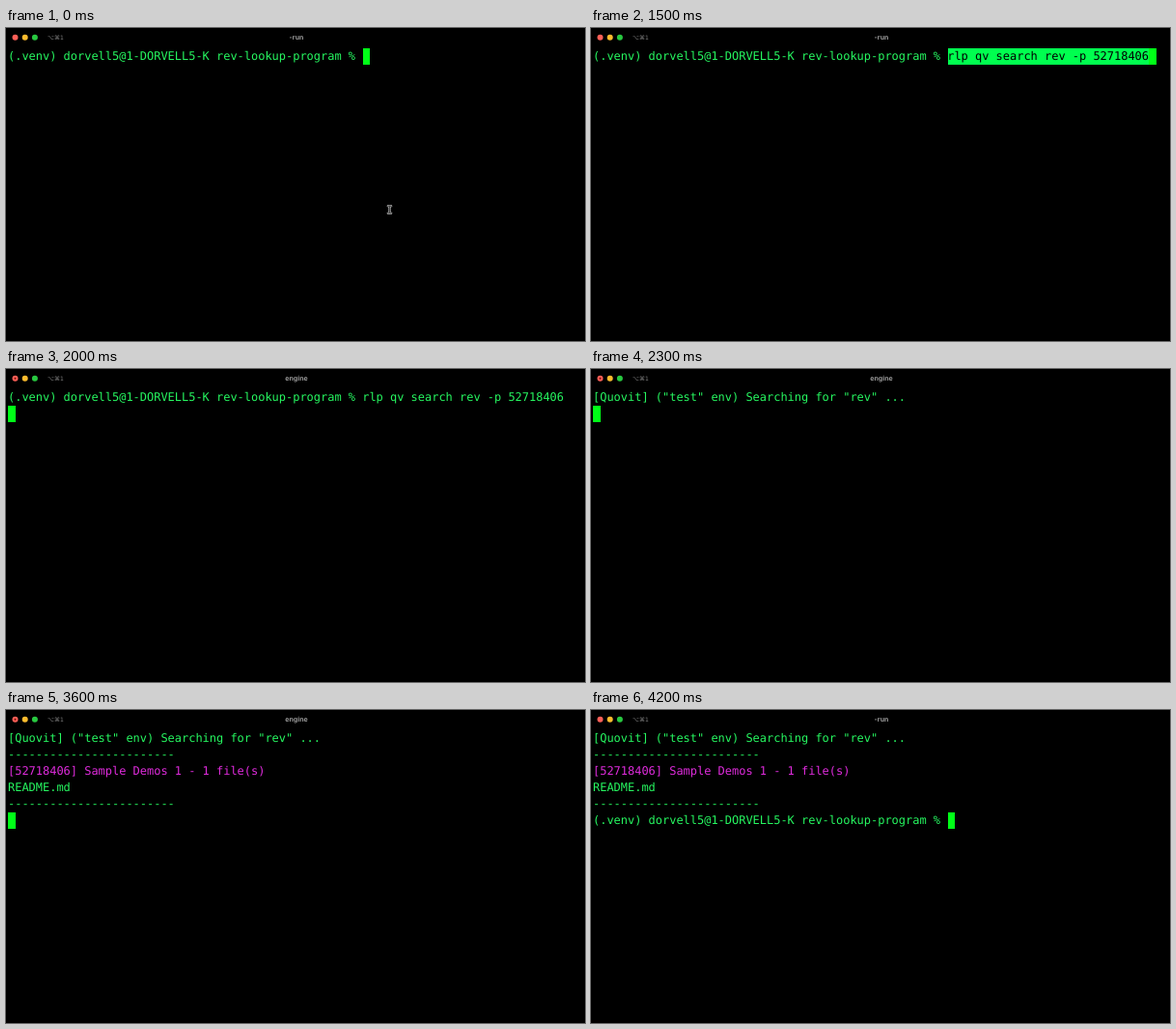
Recreate the animation shown at these times as an HTML page with a canvas. Size 600 by 324 pixels, loop 4500 ms.

```html
<!DOCTYPE html>
<html lang="en">
<head>
<meta charset="utf-8">
<title>Terminal session</title>
<style>
html, body { margin: 0; width: 100%; height: 100%; overflow: hidden; background: #000; }
canvas { display: block; }
</style>
</head>
<body>
<canvas id="stage" width="600" height="324"></canvas>
<script>
const ctx = document.getElementById('stage').getContext('2d');
ctx.textRendering = 'geometricPrecision';
const LOOP = 4500, CELL = 7.2, LINE = 17, LEFT = 2, TOP = 21;
const TEXT = '#26f760', PASTED = '#00ff4f', CURSOR = '#00ff17', MAGENTA = '#df2bdc';
const MONO = '12px "DejaVu Sans Mono", monospace';

const PROMPT = '(.venv) dorvell5@1-DORVELL5-K rev-lookup-program % ';
const COMMAND = 'rlp qv search rev -p 52718406';
const RULE = '-'.repeat(24);
const SEARCHING = '[Quovit] ("test" env) Searching for "rev" ...';
const RESULTS = [RULE, '[52718406] Sample Demos 1 - 1 file(s)', 'README.md', RULE];

const edge = col => Math.ceil(LEFT + col * CELL);

function block(col, row, cells, color) {
  ctx.fillStyle = color;
  ctx.fillRect(edge(col), TOP + row * LINE, edge(col + cells) - edge(col), LINE);
}

// Every character sits on the terminal grid.
function write(text, col, row, color = TEXT) {
  ctx.font = MONO;
  ctx.textAlign = 'left';
  ctx.fillStyle = color;
  [...text].forEach((ch, i) =>
    ctx.fillText(ch, LEFT + (col + i) * CELL, TOP + 12 + row * LINE));
}

function dot(x, y, r, color) {
  ctx.fillStyle = color;
  ctx.beginPath();
  ctx.arc(x, y, r, 0, 2 * Math.PI);
  ctx.fill();
}

function titleBar(busy) {
  ['#ff5f57', '#febc2e', '#28c840'].forEach((c, i) => dot(9.5 + i * 10.2, 9.8, 3, c));
  if (busy) dot(9.5, 9.8, 1, '#7a0e08');
  ctx.fillStyle = '#808080';
  ctx.textAlign = 'left';
  ctx.font = '6px "DejaVu Sans", sans-serif';
  ctx.fillText('⌥⌘1', 43, 12.2);
  ctx.fillStyle = '#9a9a9a';
  ctx.textAlign = 'center';
  ctx.font = '700 7px Inter, sans-serif';
  ctx.fillText(busy ? 'engine' : '-run', 301, 12.2);
}

function pointer(x, y) {
  for (const [width, color] of [[2.2, '#c4c4c4'], [0.7, '#111']]) {
    ctx.lineWidth = width;
    ctx.strokeStyle = color;
    ctx.beginPath();
    for (const s of [-1, 1]) {
      ctx.moveTo(x - 2.6, y + s * 4);
      ctx.lineTo(x, y + s * 3.4);
      ctx.lineTo(x + 2.6, y + s * 4);
    }
    ctx.moveTo(x, y - 3.4);
    ctx.lineTo(x, y + 3.4);
    ctx.stroke();
  }
}

function draw(t) {
  const end = PROMPT.length;
  ctx.fillStyle = '#000';
  ctx.fillRect(0, 0, 600, 324);
  titleBar(t >= 2000 && t < 4100);

  if (t < 2300) {
    write(PROMPT, 0, 0);
    if (t < 600) {
      block(end, 0, 1, CURSOR);
    } else if (t < 1600) {
      // Freshly pasted text stays inverted until it is run.
      block(end, 0, COMMAND.length, PASTED);
      block(end + COMMAND.length, 0, 1, CURSOR);
      write(COMMAND, end, 0, '#000');
    } else {
      write(COMMAND, end, 0);
      block(0, 1, 1, CURSOR);
    }
    if (t < 1500) pointer(397.5, 188);
    return;
  }

  write(SEARCHING, 0, 0);
  if (t < 3600) {
    block(0, 1, 1, CURSOR);
    return;
  }
  RESULTS.forEach((line, i) => write(line, 0, i + 1, i === 1 ? MAGENTA : TEXT));
  const ready = t >= 3700;
  if (ready) write(PROMPT, 0, 5);
  block(ready ? end : 0, 5, 1, CURSOR);
}

const start = performance.now();
function tick() {
  draw((performance.now() - start) % LOOP);
  requestAnimationFrame(tick);
}
tick();
</script>
</body>
</html>
```
